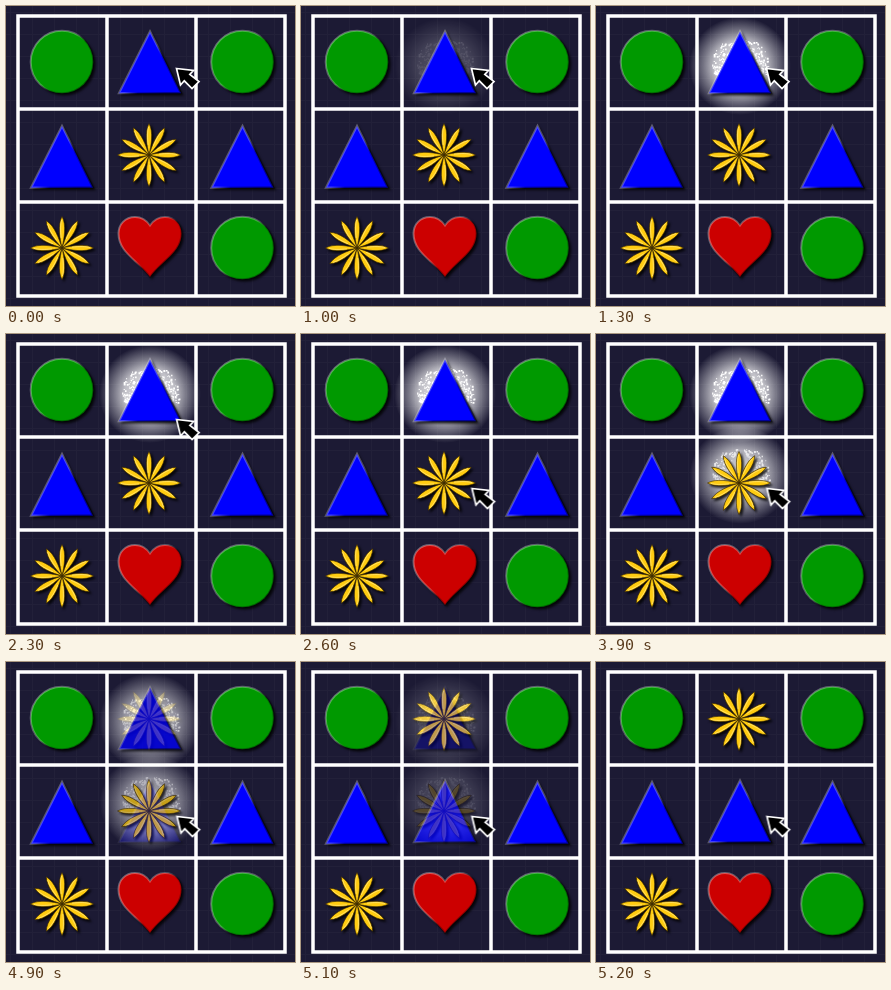
Recreate the animation shown at these times as an HTML page. Size 289 px wide and 300 px high, loop 7200 ms.

```html
<!DOCTYPE html>
<html lang="en">
<head>
<meta charset="utf-8">
<title>Tile swap</title>
<style>
html, body { margin: 0; width: 100%; height: 100%; overflow: hidden; background: #1c1a34; }
svg { display: block; width: 289px; height: 300px; }
.shadow { filter: drop-shadow(2px 2.5px 1.2px rgba(0, 0, 0, .8)); }
.board { isolation: isolate; }
.after { mix-blend-mode: plus-lighter; }
.first, .second, .before, .after, .cursor { animation: 7200ms infinite both; }
.first { animation-name: first; }
.second { animation-name: second; }
.before { animation-name: leave; }
.after { animation-name: enter; }
.cursor { animation-name: move; }
/* Each change takes four 100 ms steps, the first one at once. */
@keyframes first {
  0% { opacity: 0; }
  13.888% { opacity: 0; animation-timing-function: steps(4, jump-start); }
  19.444%, 100% { opacity: 1; }
}
@keyframes move {
  0% { transform: translate(0, 0); }
  31.944% { transform: translate(0, 0); animation-timing-function: steps(4, jump-start); }
  37.499%, 100% { transform: translate(.5px, 92px); }
}
@keyframes second {
  0% { opacity: 0; }
  49.999% { opacity: 0; animation-timing-function: steps(4, jump-start); }
  55.555%, 100% { opacity: .9; }
}
@keyframes leave {
  0% { opacity: 1; }
  68.055% { opacity: 1; animation-timing-function: steps(4, jump-start); }
  73.611%, 100% { opacity: 0; }
}
@keyframes enter {
  0% { opacity: 0; }
  68.055% { opacity: 0; animation-timing-function: steps(4, jump-start); }
  73.611%, 100% { opacity: 1; }
}
</style>
</head>
<body>
<svg viewBox="0 0 289 300">
  <defs>
    <pattern id="mesh" width="22" height="22" patternUnits="userSpaceOnUse" x="4" y="6">
      <path d="M0 .5H22M.5 0V22" stroke="#222039" fill="none"/>
    </pattern>
    <linearGradient id="bevel" x1="0" y1=".15" x2="1" y2=".85">
      <stop offset=".1" stop-color="#fff" stop-opacity=".32"/>
      <stop offset=".45" stop-color="#fff" stop-opacity=".25"/>
      <stop offset=".6" stop-color="#000" stop-opacity=".2"/>
      <stop offset=".9" stop-color="#000" stop-opacity=".4"/>
    </linearGradient>
    <radialGradient id="halo">
      <stop offset="0" stop-color="#fff" stop-opacity=".95"/>
      <stop offset=".5" stop-color="#fff" stop-opacity=".72"/>
      <stop offset=".7" stop-color="#fff" stop-opacity=".42"/>
      <stop offset=".88" stop-color="#fff" stop-opacity=".17"/>
      <stop offset="1" stop-color="#fff" stop-opacity="0"/>
    </radialGradient>
    <g id="circle" class="shadow" stroke="url(#bevel)" stroke-width="2">
      <circle r="31.3" fill="#090"/>
    </g>
    <g id="triangle" class="shadow" stroke="url(#bevel)" stroke-width="2.2">
      <path d="M0 -31L-31 30.7H31Z" fill="#00f"/>
    </g>
    <g id="heart" class="shadow" stroke="url(#bevel)" stroke-width="2">
      <path fill="#c00" d="M0 -22C-4 -28 -9 -30.5 -15 -30.5C-25 -30.5 -31.5 -23 -31.5 -14C-31.5 5 -12 13 0 29.5C12 13 31.5 5 31.5 -14C31.5 -23 25 -30.5 15 -30.5C9 -30.5 4 -28 0 -22Z"/>
    </g>
    <g id="petal">
      <path d="M0 0C-2 -9 -4.8 -23 0 -31.5C4.8 -23 2 -9 0 0Z" fill="#fc1" stroke="#372600" stroke-width=".6"/>
      <path d="M-.8 -10C-1.7 -18 -1.7 -23 -.4 -28" fill="none" stroke="#ffe680" stroke-width=".7"/>
    </g>
    <g id="flower" class="shadow"></g>
    <g id="glow">
      <ellipse rx="51" ry="49" fill="url(#halo)"/>
      <path id="sparks" fill="#fff"/>
    </g>
  </defs>

  <rect width="289" height="300" fill="#1c1a34"/>
  <rect width="289" height="300" fill="url(#mesh)"/>
  <path d="M12 10H279V290H12ZM101 10V290M190 10V290M12 103H279M12 196H279" fill="none" stroke="#fff" stroke-width="3.5"/>

  <use href="#circle" x="56" y="56"/>
  <use href="#circle" x="236.5" y="56"/>
  <use href="#triangle" x="56" y="151"/>
  <use href="#triangle" x="236.5" y="151"/>
  <use href="#flower" x="56" y="242"/>
  <use href="#heart" x="144" y="241.5"/>
  <use href="#circle" x="236.5" y="242"/>

  <g class="board">
    <g class="before">
      <g class="first"><use href="#glow" x="144" y="60"/></g>
      <g class="second"><use href="#glow" x="144.5" y="141"/></g>
      <use href="#triangle" x="144" y="56.5"/>
      <use href="#flower" x="143" y="149"/>
    </g>
    <g class="after">
      <use href="#flower" x="143" y="57"/>
      <use href="#triangle" x="144" y="149.5"/>
    </g>
  </g>

  <g class="cursor">
    <path d="M170.5 62.5L187.5 64.5L183.8 68.4L193 75.5L186 82.5L178.3 74.8L174.5 79Z" fill="#000" stroke="#fff" stroke-width="1.7"/>
  </g>
</svg>
<script>
const flower = document.getElementById("flower");
for (let i = 0; i < 12; i++) {
  const petal = document.createElementNS("http://www.w3.org/2000/svg", "use");
  petal.setAttribute("href", "#petal");
  petal.setAttribute("transform", `rotate(${i * 30})`);
  flower.append(petal);
}

let seed = 17;
const random = () => (seed = seed * 16807 % 2147483647) / 2147483647;

// Specks on both sides, dense at the triangle's flank and thinning outwards
let specks = "";
for (let i = 0; i < 240; i++) {
  const side = i % 2 ? 1 : -1;
  const y = -26 + 34 * random();
  const flank = (y + 32) / 2;
  const rim = Math.sqrt(29 ** 2 - y ** 2);
  const x = side * (flank + (rim - flank) * random() ** 1.5);
  const size = .8 + random() * 1.2;
  specks += `M${x.toFixed(1)} ${y.toFixed(1)}h${size}v${size}h${-size}z`;
}
document.getElementById("sparks").setAttribute("d", specks);
</script>
</body>
</html>
```
